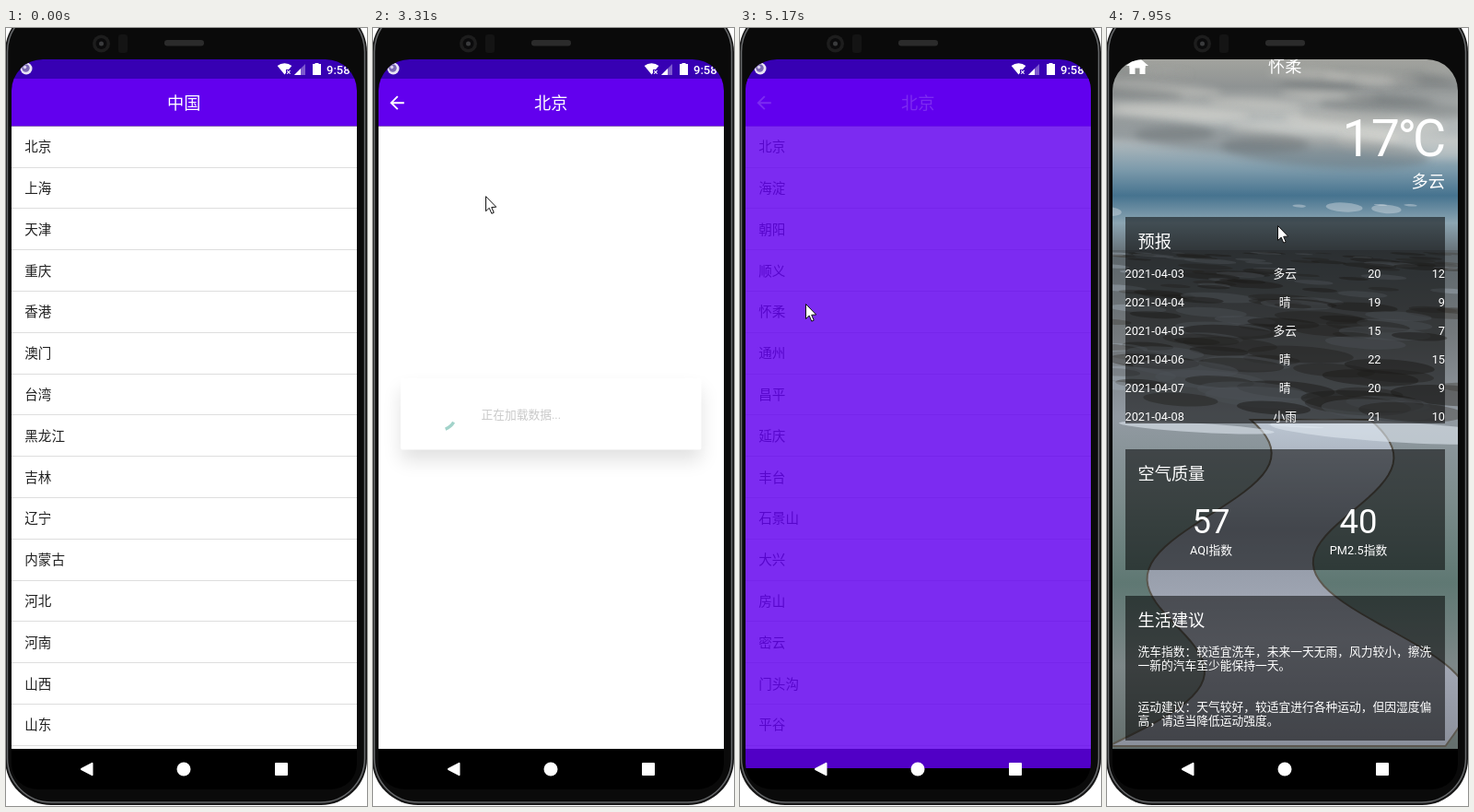
Animation of 392x844 px, one loop 8000 ms. Source, as an HTML page with a canvas:

```html
<!DOCTYPE html>
<html lang="zh-CN">
<head>
<meta charset="utf-8">
<title>天气</title>
<style>
html, body { margin: 0; width: 100%; height: 100%; overflow: hidden; background: #fff; }
canvas { display: block; width: 392px; height: 844px; }
</style>
</head>
<body>
<canvas id="stage"></canvas>
<script>
const W = 392, H = 844, LOOP = 8000;
const LEFT = 6, TOP = 34, WIDTH = 375, BOTTOM = 782, MID = 193.2;
const BAR_TOP = 55, LIST_TOP = 106.4, ROW = 44.8;
const BIG = 18.2, BODY = 14.55, SMALL = 12.75;
const FONT = 'Roboto, "Noto Sans CJK SC", "Noto Sans CJK", sans-serif';
const PURPLE = '#6200ee', DARK = '#3700b3';

const provinces = '北京 上海 天津 重庆 香港 澳门 台湾 黑龙江 吉林 辽宁 内蒙古 河北 河南 山西 山东'.split(' ');
const counties = '北京 海淀 朝阳 顺义 怀柔 通州 昌平 延庆 丰台 石景山 大兴 房山 密云 门头沟 平谷'.split(' ');
const forecast = ['多云 20 12', '晴 19 9', '多云 15 7', '晴 22 15', '晴 20 9', '小雨 21 10'];
const advice = [
  ['洗车指数：较适宜洗车，未来一天无雨，风力较小，擦洗', '一新的汽车至少能保持一天。'],
  ['运动建议：天气较好，较适宜进行各种运动，但因湿度偏', '高，请适当降低运动强度。']
];

// Pointer moves: begin, end, target x, target y
const entry = { x: 332, y: 832 };
const moves = [
  [70, 830, 96, 167], [1150, 1300, 76, 139], [1760, 2530, 103, 152], [2530, 2760, 96, 137],
  [3160, 3310, 122, 182], [3310, 3690, 143, 255], [3690, 4010, 140, 300], [4010, 4550, 71, 299],
  [5250, 5860, 80, 118], [6630, 6950, 188, 245], [6950, 7340, 186, 190], [7570, 7950, 185, 214]
];

const canvas = document.getElementById('stage');
const c = canvas.getContext('2d');
const dpr = window.devicePixelRatio || 1;
canvas.width = W * dpr;
canvas.height = H * dpr;

const ramp = (t, a, b) => Math.min(1, Math.max(0, (t - a) / (b - a)));
const smooth = p => p * p * (3 - 2 * p);

// Repeatable noise in 0..1
function noise(n) {
  const v = Math.sin(n * 127.1 + 3.7) * 43758.5453;
  return v - Math.floor(v);
}

function rect(x, y, w, h, fill) {
  c.fillStyle = fill;
  c.fillRect(x, y, w, h);
}

function round(x, y, w, h, r, fill, stroke) {
  c.beginPath();
  c.roundRect(x, y, w, h, r);
  if (fill) { c.fillStyle = fill; c.fill(); }
  if (stroke) { c.strokeStyle = stroke; c.lineWidth = 1.5; c.stroke(); }
}

function oval(x, y, rx, ry, fill, tilt = 0) {
  c.beginPath();
  c.ellipse(x, y, rx, ry, tilt, 0, Math.PI * 2);
  c.fillStyle = fill;
  c.fill();
}

const disc = (x, y, r, fill) => oval(x, y, r, r, fill);

function poly(points, fill, stroke, width = 1) {
  c.beginPath();
  points.forEach(p => c.lineTo(...p));
  c.closePath();
  if (fill) { c.fillStyle = fill; c.fill(); }
  if (stroke) { c.strokeStyle = stroke; c.lineWidth = width; c.stroke(); }
}

// y is the vertical middle of the glyphs
function text(str, x, y, size, align = 'left', color = '#fff', weight = 400) {
  c.font = `${weight} ${size}px ${FONT}`;
  c.textAlign = align;
  c.fillStyle = color;
  c.fillText(str, x, y + size * 0.37);
}

function fade(alpha, draw) {
  if (alpha <= 0) return;
  c.save();
  c.globalAlpha = alpha;
  draw();
  c.restore();
}

function clipped(x, y, w, h, r, draw) {
  c.save();
  c.beginPath();
  c.roundRect(x, y, w, h, r);
  c.clip();
  draw();
  c.restore();
}

function gradient(y0, y1, colors) {
  const g = c.createLinearGradient(0, y0, 0, y1);
  colors.forEach((color, i) => g.addColorStop(i / (colors.length - 1), color));
  return g;
}

function drawBody() {
  rect(0, 0, W, H, '#fff');
  round(-1, -24, W + 1, 867, 50, '#161616');
  round(1.5, -22, 388, 862, 48, '#0a0a0a', '#66686a');
  disc(103.5, 17, 9.5, '#1d1d1d');
  disc(103.5, 17, 6, '#0b0b0c');
  disc(103.5, 17, 2.5, '#3a3b3d');
  round(122, 7, 10, 20, 3, '#141414');
  round(172, 13, 43, 6.5, 3.2, '#2b2b2b');
}

function drawNavIcons() {
  const y = 804;
  c.lineJoin = 'round';
  poly([[82, y], [93.5, y - 6.2], [93.5, y + 6.2]], '#fff', '#fff', 2);
  c.lineJoin = 'miter';
  disc(193, y, 7.5, '#fff');
  round(292, y - 7, 14, 14, 1, '#fff');
}

function drawStatus() {
  rect(LEFT, TOP, WIDTH, BAR_TOP - TOP, DARK);
  disc(22, 44, 6.5, '#e8e4f4');
  disc(21.5, 43.5, 4.2, '#7a68b4');
  disc(20.5, 42.5, 1.8, '#d8d0ee');
  c.beginPath();
  c.moveTo(302.5, 50.5);
  c.arc(302.5, 50.5, 12.3, -Math.PI * 0.72, -Math.PI * 0.28);
  c.fillStyle = '#fff';
  c.fill();
  rect(304, 45, 7, 7, DARK);
  text('×', 307, 48, 9, 'center', '#fff', 700);
  poly([[313, 51], [325, 39], [325, 51]], 'rgba(255,255,255,.35)');
  poly([[313, 51], [320, 44], [320, 51]], '#fff');
  rect(333, 39, 9, 12, '#fff');
  rect(335.5, 38, 4, 1, '#fff');
  text('9:58', 348, 45, 13, 'left', '#fff', 500);
}

function drawBar(title, back) {
  rect(LEFT, BAR_TOP, WIDTH, LIST_TOP - BAR_TOP, PURPLE);
  text(title, MID, 81, BIG, 'center');
  if (!back) return;
  const x = 19.8, y = 81.2, r = 7;
  c.strokeStyle = '#fff';
  c.lineWidth = 1.9;
  c.beginPath();
  c.moveTo(x + 2 * r, y);
  c.lineTo(x, y);
  c.moveTo(x + r, y - r);
  c.lineTo(x, y);
  c.lineTo(x + r, y + r);
  c.stroke();
}

function drawList(items) {
  items.forEach((name, i) => {
    const y = LIST_TOP + i * ROW;
    text(name, 20.3, y + ROW / 2, BODY, 'left', '#212121');
    rect(LEFT, Math.round(y + ROW - 0.6), WIDTH, 1, '#dedede');
  });
}

function drawRipple(t, begin, row, x, y, size) {
  const p = (t - begin) / 400;
  if (p < 0 || p > 1) return;
  const shade = `rgba(0,0,0,${0.11 * Math.min(1, 2 - 2 * p)})`;
  clipped(LEFT, LIST_TOP + row * ROW, WIDTH, ROW, 0, () => disc(x, y, 15 + size * p, shade));
}

function drawDialog(t) {
  const leaving = 1 - ramp(t, 3500, 3600);
  const alpha = ramp(t, 3270, 3375) * leaving;
  if (!alpha) return;
  fade(ramp(t, 3320, 3440) * leaving * 0.5, () => rect(LEFT, TOP, WIDTH, BOTTOM - TOP, '#000'));
  c.save();
  c.shadowColor = `rgba(0,0,0,${0.08 + 0.1 * alpha})`;
  c.shadowBlur = 20 * dpr;
  c.shadowOffsetY = 12 * dpr;
  round(30, 380, 326.5, 77.5, 2, '#fff');
  c.restore();
  fade(alpha, () => {
    text('正在加载数据...', 117.5, 419, SMALL, 'left', '#757575');
    const turn = (t - 3310) / 150;
    c.beginPath();
    c.arc(73, 419, 17, 0.53 + turn, 1.22 + turn * 1.8);
    c.strokeStyle = '#128f78';
    c.lineWidth = 3.4;
    c.stroke();
  });
}

function drawAreas(t) {
  rect(LEFT, LIST_TOP, WIDTH, BOTTOM - LIST_TOP, '#fff');
  drawStatus();
  const top = t < 1910;
  drawBar(top ? '中国' : '北京', !top);
  if (top) drawList(provinces);
  else if (t < 3240) drawList(['北京']);
  else if (t >= 3560) drawList(counties);
  drawRipple(t, 1760, 0, 76, 139, 300);
  if (t < 3240) drawRipple(t, 3160, 0, 96, 137, 300);
  drawRipple(t, 4780, 4, 71, 299, 100);
  drawDialog(t);
}

// Scatter flat ovals over a band, growing towards the viewer
function scatter(count, seed, y, depth, size, flat, tones) {
  for (let i = 0; i < count; i++) {
    const d = i / count;
    const rx = size * (0.3 + d) * (0.6 + noise(seed + i));
    oval(noise(seed + i * 2.3) * W, y + depth * d * d, rx, rx * flat * (0.5 + d), tones[i % tones.length], 0.06);
  }
}

function drawSky(horizon) {
  rect(LEFT, TOP, WIDTH, horizon - TOP, gradient(TOP, horizon,
    ['#a2a39e', '#8f9393', '#b4b8b7', '#b1b9bc', '#7f9cac', '#46738f', '#8ca5b2', '#69757c']));
  c.filter = 'blur(4px)';
  scatter(26, 40, 46, 96, 60, 0.1, ['rgba(228,227,219,.35)', 'rgba(82,88,90,.3)']);
  c.filter = 'none';
  scatter(6, 70, 192, 10, 18, 0.25, ['rgba(220,226,230,.4)']);
}

// Winding sandbank between green lagoons
function drawDune() {
  const left = [], right = [];
  for (let y = 425; y <= BOTTOM; y += 6) {
    const d = ramp(y, 425, BOTTOM);
    const mid = 190 + 55 * Math.sin(d * 9 + 0.6);
    const half = 65 + 120 * d * d;
    left.push([mid - half, y]);
    right.unshift([mid + half, y]);
  }
  poly(left.concat(right), gradient(425, BOTTOM, ['#bcc6d2', '#8d95a2', '#a9aebb', '#8a8f9a']), '#5c584f', 2);
}

function drawLandscape() {
  const horizon = 241;
  drawSky(horizon);
  rect(LEFT, horizon, WIDTH, BOTTOM - horizon, gradient(horizon, BOTTOM,
    ['#5c656a', '#74797c', '#929aa2', '#7c8c8c', '#5f7873', '#7d8788', '#636e6c']));
  scatter(150, 200, horizon + 3, 175, 34, 0.12,
    ['rgba(58,57,52,.5)', 'rgba(160,170,182,.45)', 'rgba(70,68,62,.45)']);
  drawDune();
  scatter(3, 30, 432, 14, 90, 0.07, ['rgba(222,230,238,.6)']);
}

function drawHome() {
  const x = 33, y = 81;
  poly([[x, y - 10.5], [x + 12, y], [x - 12, y]], '#fff');
  [-8.5, 2.5].forEach(dx => rect(x + dx, y - 1, 6, 10, '#fff'));
  rect(x - 8.5, y - 1, 17, 3.5, '#fff');
}

function card(y, h, title) {
  rect(20, y, 347, h, 'rgba(0,0,0,.53)');
  text(title, 33.5, y + 26, BIG);
}

function drawWeather(t) {
  const scroll = 45 * smooth(ramp(t, 6950, 7340)) - 5 * ramp(t, 7570, 7950);
  const edge = 367;
  c.save();
  c.translate(0, -scroll);
  drawHome();
  text('怀柔', MID, 81, BIG, 'center');
  text('17:58', 371, 66.8, BODY, 'right');
  text('17', 255.5, 158.5, 55.5);
  text('°', 315.5, 158.5, 55.5);
  text('C', edge + 1, 158.5, 55.5, 'right');
  text('多云', edge, 206, BIG, 'right');

  card(245, 224, '预报');
  forecast.forEach((day, i) => {
    const y = 306 + i * 31;
    const [sky, high, low] = day.split(' ');
    text('2021-04-0' + (i + 3), 19.5, y, SMALL);
    text(sky, MID, y, SMALL, 'center');
    text(high, 297.5, y, SMALL, 'right');
    text(low, edge, y, SMALL, 'right');
  });

  card(497, 131, '空气质量');
  [['57', 'AQI指数'], ['40', 'PM2.5指数']].forEach(([value, label], i) => {
    const x = 113 + i * 160;
    text(value, x, 574, 36.5, 'center');
    text(label, x, 606, SMALL, 'center');
  });

  card(656, 157, '生活建议');
  advice.forEach((lines, i) => lines.forEach((line, k) => {
    text(line, 33.5, 716.5 + i * 60 + k * 15, SMALL);
  }));
  c.restore();
}

function drawCursor(t) {
  if (t < moves[0][0]) return;
  let { x, y } = entry;
  for (const [begin, end, toX, toY] of moves) {
    const p = ramp(t, begin, end);
    x += (toX - x) * p;
    y += (toY - y) * p;
  }
  c.save();
  c.translate(x + 0.5, y + 0.5);
  poly([[0, 0], [0, 16], [3.7, 12.6], [6.3, 18.6], [8.7, 17.6], [6.2, 11.8], [11.2, 11.5]], '#fff', '#111');
  c.restore();
}

function drawScreen(t) {
  rect(LEFT, TOP, WIDTH, H, '#000');
  clipped(LEFT, TOP, WIDTH, BOTTOM - TOP, 0, () => {
    if (t < 5400) drawAreas(t);
    else if (t < 6020) rect(LEFT, TOP, WIDTH, BOTTOM - TOP, PURPLE);
    else drawLandscape();
    if (t >= 5940) drawWeather(t);
  });
  if (t < 5400) {
    const alpha = 0.83 * ramp(t, 5100, 5160) + 0.17 * ramp(t, 5250, 5330);
    const shift = 21 * (1 - ramp(t, 5250, 5400));
    fade(alpha, () => rect(LEFT, TOP + shift, WIDTH, BOTTOM - TOP, PURPLE));
  }
  drawNavIcons();
}

function render(t) {
  c.setTransform(dpr, 0, 0, dpr, 0, 0);
  drawBody();
  clipped(LEFT, TOP, WIDTH, 792, [34, 34, 28, 28], () => drawScreen(t));
  drawCursor(t);
}

const start = performance.now();
function tick() {
  render((performance.now() - start) % LOOP);
  requestAnimationFrame(tick);
}
tick();
</script>
</body>
</html>
```
